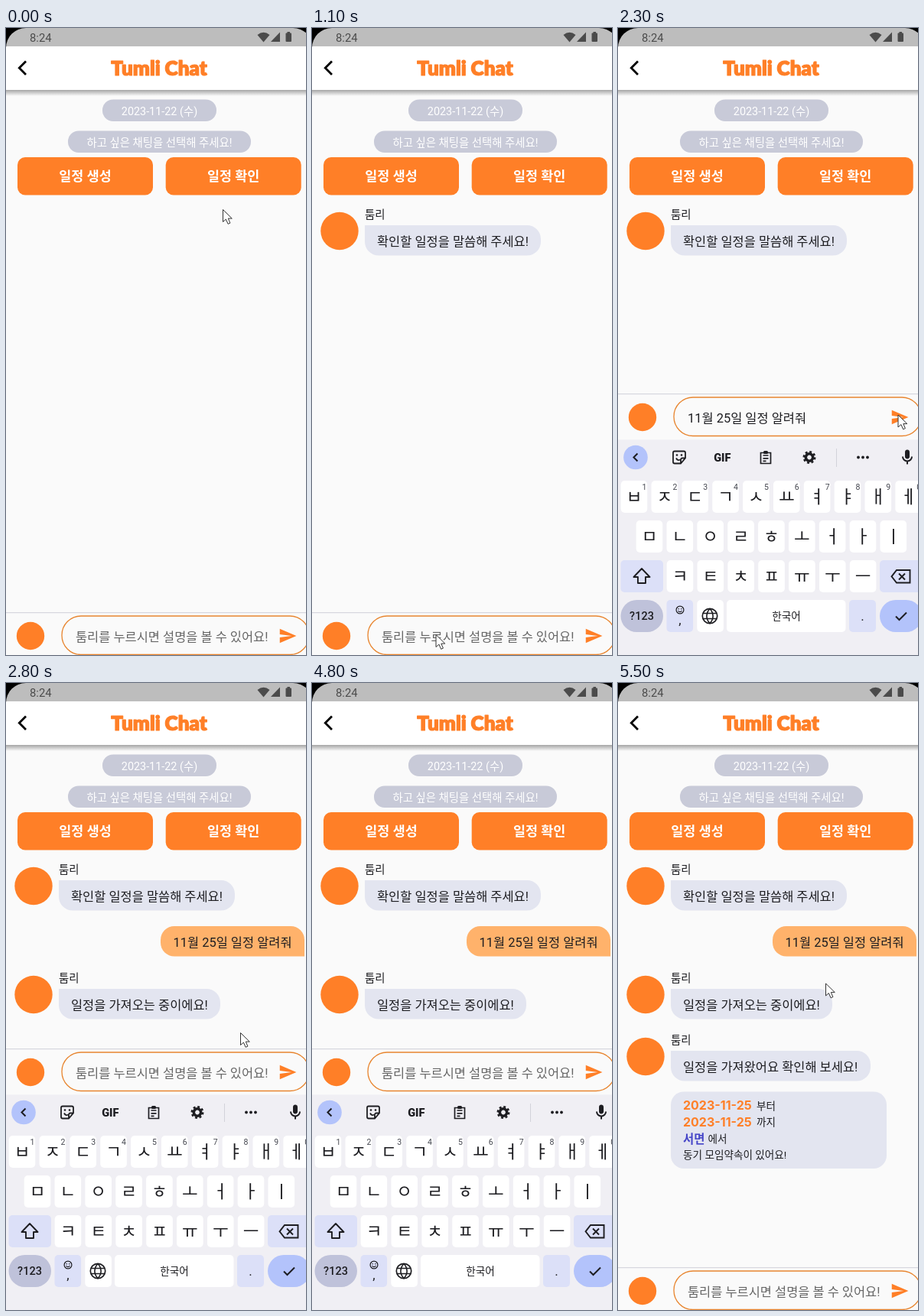
Animation, 392 px wide and 820 px high, one loop 5600 ms. Source, as an HTML page:

```html
<!DOCTYPE html>
<html lang="ko">
<head>
<meta charset="utf-8">
<title>Chat</title>
<style>
html, body { margin: 0; width: 100%; height: 100%; overflow: hidden; background: #fafafa; }
svg { display: block; width: 392px; height: 820px; }
text { font-family: Roboto, "Noto Sans CJK KR", "Noto Sans CJK", sans-serif; white-space: pre; }
</style>
</head>
<body>
<svg id="stage" viewBox="0 0 392 820" xmlns="http://www.w3.org/2000/svg"></svg>
<script>
const LOOP = 5600, STEP = 100, RISE = 286;
const ORANGE = '#ff7f27', BUBBLE = '#e3e5f0', INK = '#1d1d21', TINT = '#dce0f8', BLUE = '#b3c3fb';
const BODY = 16.45, SMALL = 14.4;
const BOT = '툼리', QUERY = '11월 25일 일정 알려줘';

// cy is the middle of the line of text
const text = (s, x, cy, size, fill = INK, more = '') =>
  `<text x="${x}" y="${(cy + size * .37).toFixed(2)}" font-size="${size}" fill="${fill}" ${more}>${s}</text>`;
const mid = (s, x, cy, size, fill, more = '') => text(s, x, cy, size, fill, `text-anchor="middle" ${more}`);
const rect = (x, y, w, h, r, fill, more = '') =>
  `<rect x="${x}" y="${y}" width="${w}" height="${h}" rx="${r}" fill="${fill}" ${more}/>`;
const dot = (x, y, r, fill, more = '') => `<circle cx="${x}" cy="${y}" r="${r}" fill="${fill}" ${more}/>`;
const line = (d, color = INK, w = 2, more = '') =>
  `<path d="${d}" fill="none" stroke="${color}" stroke-width="${w}" ${more}/>`;
const fill = (d, color = INK, more = '') => `<path d="${d}" fill="${color}" ${more}/>`;
const group = (id, body, more = '') => `<g id="${id}" ${more}>${body}</g>`;
const at = (x, y, body) => `<g transform="translate(${x} ${y})">${body}</g>`;

const bold = 'font-weight="700"';

function botSays(y, width, s) {
  const r = 18, h = 39.5;
  const shape = `M69 ${y}h${width - r}a${r} ${r} 0 0 1 ${r} ${r}v${h - 2 * r}a${r} ${r} 0 0 1 ${-r} ${r}` +
    `h${2 * r - width}a${r} ${r} 0 0 1 ${-r} ${-r}z`;
  return dot(36, y + 7.5, 24.7, ORANGE) + text(BOT, 69, y - 14, SMALL) +
    fill(shape, BUBBLE) + text(s, 85, y + 21, BODY);
}

function userSays(y, s) {
  const r = 18;
  return fill(`M${202 + r} ${y}H${390 - r}a${r} ${r} 0 0 1 ${r} ${r}v21.5H${202 + r}` +
    `a${r} ${r} 0 0 1 ${-r} ${-r}v-3.5a${r} ${r} 0 0 1 ${r} ${-r}z`, '#ffb26b') +
    text(s, 218.5, y + 21, BODY);
}

function card() {
  const date = cy => text('2023-11-25', 85, cy, 16, ORANGE, `${bold} style="font-family:Inter,sans-serif"`);
  return rect(69, 534.5, 282, 100.5, 17, BUBBLE) +
    date(552.5) + text('부터', 181, 552.5, 13.6) +
    date(574) + text('까지', 181, 574, 13.6) +
    text('서면', 85, 596, 15.4, '#4646c8', bold) + text('에서', 117.5, 596, 13.6) +
    text('동기 모임약속이 있어요!', 85, 616.5, 13.6);
}

function chat() {
  const pill = (x, y, w, s) => rect(x, y, w, 28.5, 14, '#c8cad8') + mid(s, x + w / 2, y + 15, SMALL, '#fff');
  const button = (x, s) => rect(x, 169, 177, 49.5, 10, ORANGE) + mid(s, x + 88.5, 193.6, 17.4, '#fff', bold);
  return pill(126, 93.5, 149, '2023-11-22 (수)') + pill(81, 134.5, 239, '하고 싶은 채팅을 선택해 주세요!') +
    button(15, '일정 생성') + button(208.7, '일정 확인') +
    group('press', rect(208.7, 169, 177, 49.5, 10, '#fff', 'opacity=".22"')) +
    group('ask', botSays(258, 230, '확인할 일정을 말씀해 주세요!')) +
    group('sent', userSays(318, QUERY)) +
    group('wait', botSays(400, 211, '일정을 가져오는 중이에요!')) +
    group('found', botSays(481, 261, '일정을 가져왔어요 확인해 보세요!') + card());
}

function inputRow() {
  return rect(0, 764, 392, 60.5, 0, '#fafafa') + rect(0, 764, 392, 1.2, 0, '#d6d7de') +
    dot(32, 795, 18.2, ORANGE) +
    rect(73, 769, 323, 50.5, 25, 'none', 'stroke="#e8852f" stroke-width="1.3"') +
    group('hint', text(BOT + '를 누르시면 설명을 볼 수 있어요!', 91, 795.9, BODY, '#666')) +
    group('typed', text(QUERY, 91, 795.9, BODY)) +
    fill('M2 21 23 12 2 3v7l15 2-15 2z', ORANGE, 'transform="translate(355.7 782.7) scale(1.03)"');
}

function clipboard(color) {
  return line('M-6.5 -6.5h13v14h-13zM-3.5 -3h7M-3.5 .8h7M-3.5 4.4h4', color, 1.7) + rect(-3, -9, 6, 4, 1.5, color);
}

function toolbar() {
  const chip = (x, w) => rect(x, 546, w, 31.5, 8, '#fff', 'stroke="#dcdce6"');
  const sticker = line('M8 1V-6a2 2 0 0 0-2-2H-6a2 2 0 0 0-2 2V6a2 2 0 0 0 2 2H2zM2 8V3a2 2 0 0 1 2-2H8M-4 1Q-2 5 1 3', INK, 1.8) +
    dot(-3, -3, 1.3, INK) + dot(3, -3, 1.3, INK);
  const gear = dot(0, 0, 4.7, 'none', `stroke="${INK}" stroke-width="3.6"`) +
    dot(0, 0, 7.2, 'none', `stroke="${INK}" stroke-width="2.6" stroke-dasharray="2.9 2.755"`);
  const mic = 'M12 14c1.7 0 3-1.3 3-3V5c0-1.7-1.3-3-3-3S9 3.3 9 5v6c0 1.7 1.3 3 3 3z';
  return dot(23, 561.5, 15.8, BLUE) +
    group('chips', line('M20.5 556.5l5 5-5 5') +
      chip(81.5, 147.5) + at(99.5, 562, clipboard('#aebcf2')) + text('11월 25일 일정...', 113, 562, 14, INK, 'font-weight="500"') +
      chip(238.5, 89) + at(256.5, 562, clipboard('#aebcf2') + dot(4.5, 4.5, 4.5, '#fff', 'stroke="#aebcf2" stroke-width="1.6"') +
        line('M4.5 2v2.8h2', '#aebcf2', 1.2)) + text('11월 25', 270, 562, 14, INK, 'font-weight="500"')) +
    group('tools', line('M25.5 556.5l-5 5 5 5') + at(80, 561.5, sticker) +
      mid('GIF', 136.3, 561.5, 14.5, INK, 'font-weight="900"') + at(193, 562, clipboard(INK)) + at(250, 561.5, gear) +
      rect(285, 550, 1, 24, 0, '#d2d2da') + [314, 320, 326].map(x => dot(x, 561.5, 1.9, INK)).join('')) +
    at(366, 549.5, fill(mic) + line('M6 11a6 6 0 0 0 12 0M12 17v4'));
}

function keyboard() {
  const PITCH = 39.85;
  const row = (letters, x, y, digits) => [...letters].map((c, i) => {
    const cx = x + i * PITCH;
    return rect(cx - 17.3, y, 34.6, 42, 5, '#fff') + mid(c, cx, y + 20.7, 22.5, INK, 'font-weight="500"') +
      (digits ? mid((i + 1) % 10, cx + 13.5, y + 8.5, 10.5, '#44464f') : '');
  }).join('');
  const globe = dot(0, 0, 9.7, 'none', `stroke="${INK}" stroke-width="1.7"`) +
    line('M-9 -3.5H9M-9 3.5H9M0 -9.5C-5.5 -4 -5.5 4 0 9.5C5.5 4 5.5 -4 0 -9.5', INK, 1.6);
  const face = dot(0, 0, 4.9, 'none', `stroke="${INK}" stroke-width="1.2"`) + dot(-1.8, -1.3, .8, INK) +
    dot(1.8, -1.3, .8, INK) + line('M-2.5 1.2Q0 4 2.5 1.2', INK, 1.1);
  return rect(0, 537.5, 392, 290, 0, '#f0eff4') + toolbar() +
    row('ㅂㅈㄷㄱㅅㅛㅕㅑㅐㅔ', 21, 592, true) +
    row('ㅁㄴㅇㄹㅎㅗㅓㅏㅣ', 41, 644) +
    row('ㅋㅌㅊㅍㅠㅜㅡ', 81, 696) +
    rect(3.5, 696, 55.5, 42, 5, TINT) + line('M31 707l-10.5 11h5.5v8h10v-8h5.5z', INK, 1.9, 'stroke-linejoin="round"') +
    rect(342, 696, 55.5, 42, 5, TINT) + line('M364 709h17.5v16.5h-17.5l-6.5-8.2zM367 713.5l8 8m0-8l-8 8', INK, 1.9) +
    rect(3.5, 748, 55.5, 42, 21, '#bfc2da') + mid('?123', 31, 769, 14.5, INK, 'font-weight="500"') +
    rect(63.5, 748, 34.6, 42, 5, TINT) + at(81, 761, face) + mid(',', 81, 774, 17) +
    rect(103.3, 748, 34.6, 42, 5, '#fff') + at(120, 769, globe) +
    rect(142, 748, 155.5, 42, 5, '#fff') + mid('한국어', 220, 769, 13.6) +
    rect(302, 748, 35, 42, 5, TINT) + mid('.', 319.5, 769, 17) +
    rect(342, 748, 55.5, 42, 21, BLUE) + line('M363 769.5l4.5 4.5 9.5-9.5');
}

function header() {
  const grey = '#4b4b4b';
  return rect(0, 81, 392, 8, 0, 'url(#shade)') + rect(0, 24, 392, 57, 0, '#fff') + rect(0, 0, 392, 24, 0, '#bdbdbd') +
    text('8:24', 31, 12.5, 14.8, grey) +
    fill('M328.5 9Q336.5 2.5 344.5 9L336.5 18.5z', grey) + fill('M358 5.5V18H346z', grey) +
    rect(365.5, 6.5, 7.5, 11.5, 1, grey) + rect(367.5, 5, 3.5, 2, 0, grey) +
    // The phone is 401 wide, so the stage cuts its right corner
    fill('M0 0V26A26 26 0 0 1 26 0zM401 0V26A26 26 0 0 0 375 0z', '#000') +
    line('M26 43.5l-8.7 8.8 8.7 8.8', '#000', 2.8) +
    mid('Tumli Chat', 200, 52, 26, ORANGE, `style="font-family:Lato,sans-serif;font-weight:900" stroke="${ORANGE}" stroke-width="1.2" stroke-linejoin="round"`);
}

const stage = document.getElementById('stage');
stage.innerHTML =
  `<defs><linearGradient id="shade" x2="0" y2="1"><stop stop-opacity=".34"/><stop offset="1" stop-opacity="0"/></linearGradient>
  <linearGradient id="haze" x2="0" y2="1"><stop stop-color="#dce5fa"/><stop offset="1" stop-color="#e6ebf8"/></linearGradient></defs>` +
  rect(0, 0, 392, 820, 0, '#fafafa') + group('chat', chat()) +
  group('sweep', fill('M7 759V741Q200 715 392 741V754Q200 750 7 759z', 'url(#haze)')) +
  group('keys', keyboard()) + group('input', inputRow()) + header() +
  group('cursor', fill('M0 0V16l3.9-3.4 2.7 6.2 2.8-1.2-2.6-6h5z', '#fff', 'stroke="#333" stroke-width="1" stroke-linejoin="round"'));

const el = {};
stage.querySelectorAll('g[id]').forEach(g => el[g.id] = g);

// [time, value...] tables, linear between rows
const OPEN = [[1100, 0], [1200, .3], [1300, .85], [1400, 1], [4800, 1], [4900, .45], [5000, 0]];
const SCROLL = [[4800, 0], [4900, 24], [5000, 4.6], [5100, 0]];
const POINTER = [[0, 283.5, 237.5], [100, 291, 210], [200, 296, 195], [300, 296, 195], [400, 260, 370], [500, 200, 640],
  [600, 166, 780], [700, 162, 793.5], [1200, 162, 793.5], [1400, 175, 660], [1500, 184, 570], [1600, 184.5, 562], [1900, 184.5, 562],
  [2100, 290, 530], [2300, 366, 506], [2500, 366, 506], [2700, 320, 465], [2800, 306.5, 457.5], [2900, 366, 520], [3000, 400, 600],
  [5100, 400, 830], [5200, 366, 770], [5300, 322, 600], [5400, 284, 450], [5500, 271.5, 393]];

function sample(table, t) {
  const i = table.findIndex(row => row[0] > t);
  if (i === 0) return table[0].slice(1);
  if (i < 0) return table[table.length - 1].slice(1);
  const a = table[i - 1], b = table[i], k = (t - a[0]) / (b[0] - a[0]);
  return a.slice(1).map((v, j) => v + (b[j + 1] - v) * k);
}

const move = (g, x, y) => g.setAttribute('transform', `translate(${x} ${y})`);
const show = (g, on) => g.setAttribute('visibility', on ? 'visible' : 'hidden');

function draw(t) {
  const during = (from, to = LOOP) => t >= from && t < to;
  const [open] = sample(OPEN, t);
  move(el.chat, 0, -sample(SCROLL, t)[0]);
  move(el.input, 0, -RISE * open);
  move(el.keys, 0, RISE * (1 - open));
  move(el.cursor, ...sample(POINTER, t));
  show(el.keys, open > 0);
  show(el.press, during(200, 400));
  show(el.ask, during(400));
  show(el.sent, during(2500));
  show(el.wait, during(2600));
  show(el.found, during(4900));
  show(el.typed, during(1900, 2500));
  show(el.hint, !during(1900, 2500));
  // These sit inside the keyboard, so display keeps them from outliving it
  el.chips.style.display = t < 1900 ? '' : 'none';
  el.tools.style.display = t < 1900 ? 'none' : '';
  show(el.sweep, during(5000, 5100));
  show(el.cursor, !during(3000, 5200));
}

const start = performance.now();
function tick() {
  const t = Math.max(0, performance.now() - start) % LOOP;
  draw(Math.floor(t / STEP) * STEP);
  requestAnimationFrame(tick);
}
tick();
</script>
</body>
</html>
```
